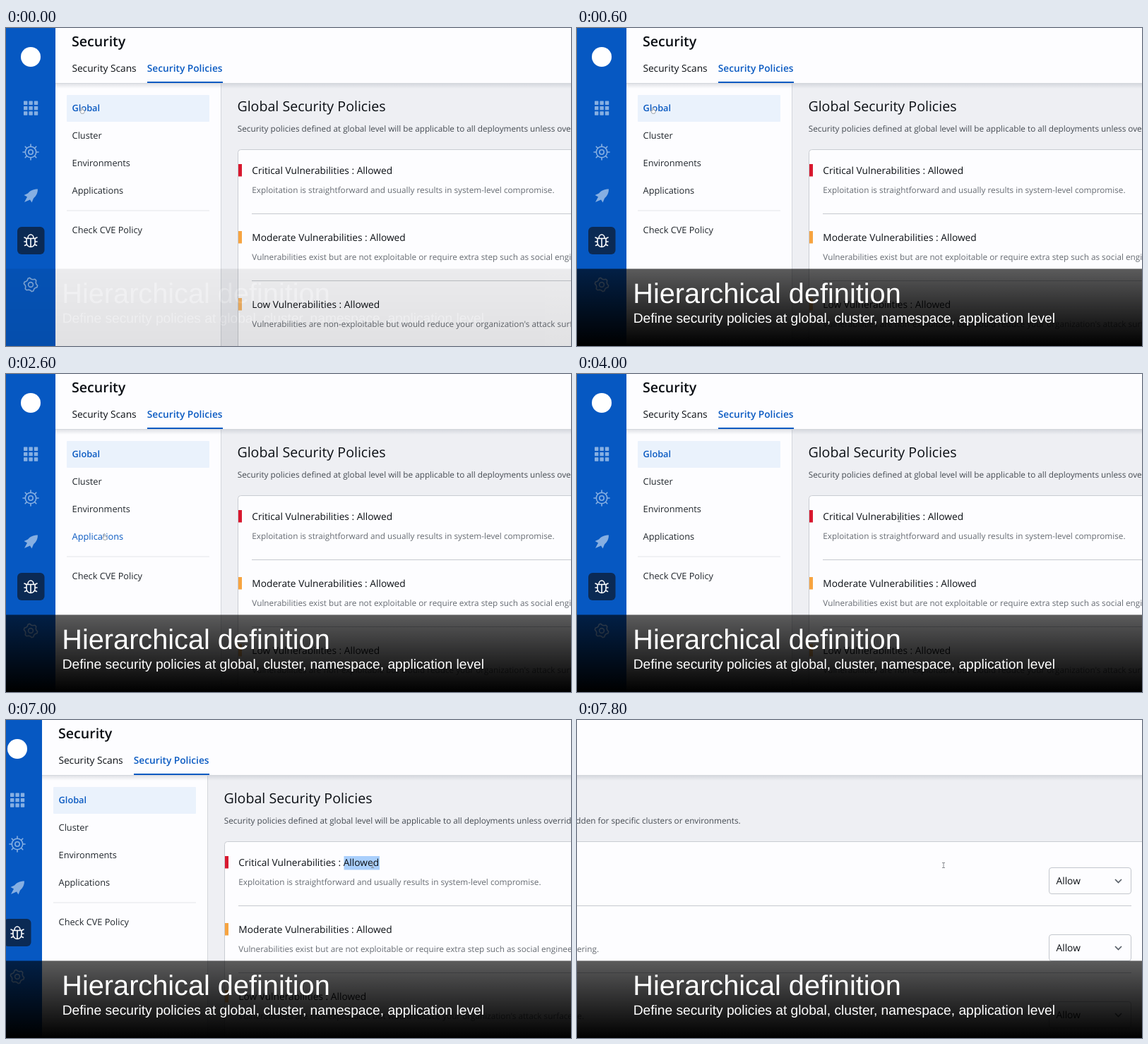
Recreate the animation shown at these times as an HTML page. Size 800 px wide and 451 px high, loop 8000 ms.

```html
<!DOCTYPE html>
<html lang="en">
<head>
<meta charset="utf-8">
<title>Security policies</title>
<style>
  html, body { margin: 0; width: 100%; height: 100%; overflow: hidden; background: #fdfdff; }
  svg { display: block; width: 100vw; height: 100vh; }
  text { font-family: "Open Sans", sans-serif; font-size: 13.72px; fill: #0b0f14; white-space: pre; text-rendering: geometricPrecision; }
  .title { font-size: 19.6px; }
  .menu { font-size: 12.74px; fill: #20262c; }
  .note { font-size: 11.76px; fill: #666b72; }
  .intro { font-size: 11.76px; fill: #454b52; }
  .strong { font-weight: 600; }
  .active { font-weight: 600; fill: #0a5ac2; }
  .hover { fill: #0a5ac2; }
  .rule { stroke: #c6c9cf; }
  .icon { fill: none; stroke: #86afe2; stroke-width: 1.6; stroke-linecap: round; stroke-linejoin: round; }
  .caption text { font-family: "Liberation Sans", Arial, sans-serif; fill: #fff; }
</style>
</head>
<body>
<svg viewBox="0 0 800 451" preserveAspectRatio="none">
  <defs>
    <linearGradient id="shade" x2="0" y2="1">
      <stop offset="0" stop-opacity=".64"/>
      <stop offset="1" stop-opacity="1"/>
    </linearGradient>
    <linearGradient id="shadow" x2="0" y2="1">
      <stop offset="0" stop-color="#8c93a0" stop-opacity=".28"/>
      <stop offset="1" stop-color="#8c93a0" stop-opacity="0"/>
    </linearGradient>
  </defs>

  <g id="page">
    <rect width="1700" height="451" fill="#fdfdff"/>
    <rect x="304" y="78" width="1400" height="373" fill="#eeeff3"/>
    <path d="M304.5 78V451" stroke="#d3d6dc"/>
    <rect x="328.5" y="172.5" width="1300" height="300" rx="4" fill="#fdfdff" stroke="#c9ccd2"/>
    <rect x="70" y="78" width="1630" height="8" fill="url(#shadow)"/>
    <path d="M70 78.5H1700" stroke="#d4d7dc"/>

    <text class="title strong" x="93" y="25.5">Security</text>
    <text x="93.4" y="61.5">Security Scans</text>
    <text class="active" x="199.8" y="61.5">Security Policies</text>
    <rect x="200" y="76" width="107" height="2" fill="#0a5ac2"/>

    <rect x="86" y="95" width="202" height="38" rx="1" fill="#eaf2fc"/>
    <g id="menu"></g>
    <path d="M86 259H288" stroke="#e3e5e9"/>

    <text class="title" x="327.4" y="118">Global Security Policies</text>
    <text class="intro" x="327.8" y="147">Security policies defined at global level will be applicable to all deployments unless overridden for specific clusters or environments.</text>
    <rect id="selection" x="497.5" y="193" width="50.5" height="19.5" fill="#a9cffc"/>
    <g id="levels"></g>

    <rect width="70" height="451" fill="#0658c2"/>
    <circle cx="35" cy="41" r="14" fill="#fff"/>
    <g id="grid" fill="#86afe2"></g>
    <g class="icon" transform="translate(35 176)">
      <circle r="7.7"/><circle r="3.2"/>
      <g id="spokes"></g>
    </g>
    <path transform="translate(35 238)" fill="#86afe2" d="M10-9.5C3-9.5-1-7-4-3.5L-9.5-1-5 1.5-9 9-1 5.5 1.5 9.5 4 3.5C8 0 10-4 10-9.5Z"/>
    <rect x="16" y="282" width="38.5" height="39" rx="6" fill="#0b2a54"/>
    <path class="icon" transform="translate(35 301.5)" style="stroke:#fff" d="M-6-3H6V3A6 6 0 0 1-6 3ZM-4-3.500A4 5 0 0 1 4-3.500M0-2.500V8.500M-9 1.500H-6M6 1.500H9M-6-3-9-4.500M6-3 9-4.500M-5.500 5.500-8.500 7M5.500 5.500 8.500 7"/>
    <g class="icon" transform="translate(35 364)">
      <path id="gear"/><circle r="3.4"/>
    </g>
  </g>

  <g id="cursor" stroke-linejoin="round">
    <path id="hand" d="M-1.500-4Q-.7-5 .2-4V-1L3-.2V2.500L2 4.200H-1.500L-3.500.8-2.700 0-1.500.8Z" fill="#fff" stroke="#858b93" stroke-width=".8"/>
    <path id="beam" d="M-2-3.500H2M0-3.500V3.500M-2 3.500H2" fill="none" stroke="#8a8d92"/>
  </g>

  <g id="caption" class="caption">
    <rect y="341.500" width="800" height="109.500" fill="url(#shade)"/>
    <g id="words">
      <text x="79.3" y="390" style="font-size:39.7px">Hierarchical definition</text>
      <text x="79.7" y="418" style="font-size:19.2px">Define security policies at global, cluster, namespace, application level</text>
    </g>
  </g>
</svg>

<script>
const LOOP = 8000, STEP = 200;
const $ = id => document.getElementById(id);

const menuItems = [['Global', 118], ['Cluster', 157.3], ['Environments', 196.3], ['Applications', 235.3], ['Check CVE Policy', 291.3]];
const levels = [
  ['Critical', '#d8182f', 'Exploitation is straightforward and usually results in system-level compromise.'],
  ['Moderate', '#f7a440', 'Vulnerabilities exist but are not exploitable or require extra step such as social engineering.'],
  ['Low', '#fab868', "Vulnerabilities are non-exploitable but would reduce your organization's attack surface."]
];

$('menu').innerHTML = menuItems.map(([label, y], i) =>
  `<text class="menu ${i ? '' : 'active'}" x="93.6" y="${y}">${label}</text>`).join('');

$('levels').innerHTML = levels.map(([name, color, note], i) => `
  <g transform="translate(0 ${i * 95})">
    <rect x="329" y="193" width="5" height="17.5" fill="${color}"/>
    <text x="348.300" y="207.200">${name} Vulnerabilities : Allowed</text>
    <text class="note" x="348.300" y="233.700">${note}</text>
    <path class="rule" d="M348 263.500H1599"/>
    <rect x="1482.500" y="209.500" width="116" height="37" rx="3.500" fill="#fdfdff" stroke="#c3c7cd"/>
    <text x="1492.500" y="233.300">Allow</text>
    <path d="M1576 226l4.500 4.500 4.500-4.500" fill="none" stroke="#596069" stroke-width="1.700"/>
  </g>`).join('');

$('grid').innerHTML = Array.from({ length: 9 }, (_, i) =>
  `<rect x="${25 + i % 3 * 7.4}" y="${103.5 + Math.floor(i / 3) * 7.4}" width="5.4" height="5.4" rx=".6"/>`).join('');

$('spokes').innerHTML = Array.from({ length: 8 }, (_, i) =>
  `<path d="M0-8V-11" transform="rotate(${i * 45})"/>`).join('');

$('gear').setAttribute('d', 'M' + Array.from({ length: 24 }, (_, i) => {
  const angle = (i + .5) * Math.PI / 12, radius = i % 4 < 2 ? 9.7 : 7.8;
  return `${(radius * Math.sin(angle)).toFixed(2)} ${(radius * Math.cos(angle)).toFixed(2)}`;
}).join('L') + 'Z');

// Keys are [time, value, ...]; values are interpolated linearly.
function at(keys, t) {
  const next = keys.findIndex(key => key[0] > t);
  if (next < 0) return keys.at(-1).slice(1);
  if (next === 0) return keys[0].slice(1);
  const a = keys[next - 1], b = keys[next], k = (t - a[0]) / (b[0] - a[0]);
  return a.slice(1).map((v, i) => v + (b[i + 1] - v) * k);
}

// Opacity of the whole caption, then of its words within it.
const fade = [[0, .11, .4], [200, .5, .8], [400, .88, 1], [600, 1, 1]];
const pan = [[6800, 0], [7000, 19], [7200, 59], [7400, 264], [7600, 630], [7800, 814]];
const pointer = [
  [1200, 108, 117], [1600, 114, 152], [1800, 118, 156], [2000, 126, 190],
  [2200, 133, 197], [2400, 140, 231], [2800, 140, 231], [3200, 250, 224],
  [3600, 430, 208], [3800, 456, 206], [4200, 456, 206], [4800, 519, 206]
];

function draw(now) {
  const t = Math.floor(now % LOOP / STEP) * STEP;
  const [x, y] = at(pointer, t);
  const [captionOpacity, wordOpacity] = at(fade, t);
  const overMenu = x < 288;

  $('page').setAttribute('transform', `translate(${-at(pan, t)[0]} 0)`);
  $('caption').setAttribute('opacity', captionOpacity);
  $('words').setAttribute('opacity', wordOpacity);
  $('selection').setAttribute('visibility', t >= 5200 ? 'visible' : 'hidden');
  $('cursor').setAttribute('transform', `translate(${x} ${y})`);
  $('hand').setAttribute('visibility', overMenu ? 'visible' : 'hidden');
  $('beam').setAttribute('visibility', overMenu ? 'hidden' : 'visible');
  [...$('menu').children].forEach((item, i) =>
    item.classList.toggle('hover', overMenu && Math.abs(menuItems[i][1] - 4 - y) < 19));
}

function tick() {
  draw(performance.now());
  requestAnimationFrame(tick);
}
tick();
</script>
</body>
</html>
```
